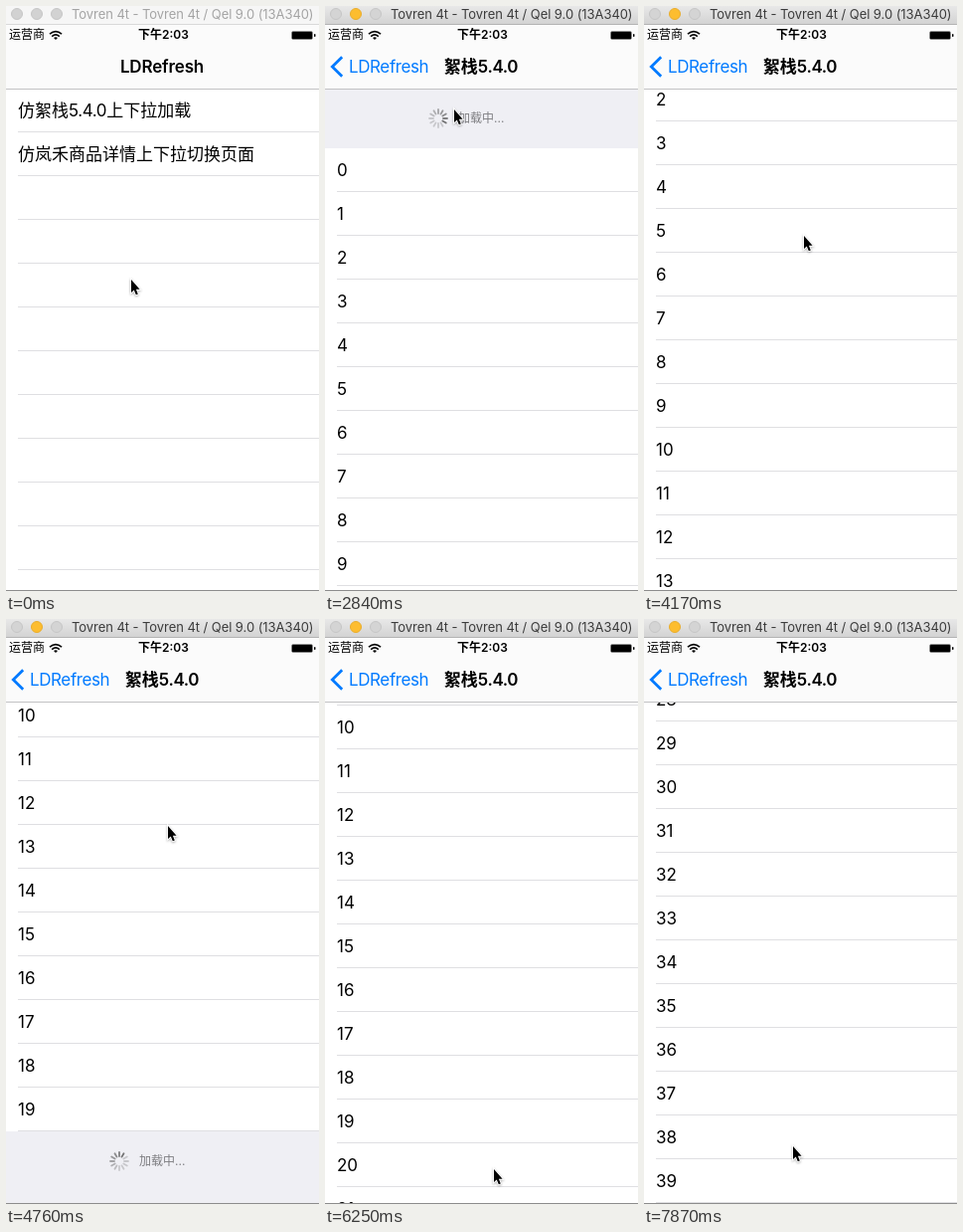
Recreate the animation shown at these times as an HTML page. Size 315 by 588 pixels, loop 8000 ms.

```html
<!DOCTYPE html>
<html lang="zh">
<head>
<meta charset="utf-8">
<title>LDRefresh</title>
<style>
html, body { margin: 0; width: 100%; height: 100%; overflow: hidden; background: #fff; }
#stage { position: relative; width: 315px; height: 588px; overflow: hidden; background: #fff;
  font: 17px/44px Inter, "Noto Sans CJK SC", sans-serif; color: #000; white-space: nowrap; }
#stage div, #stage svg, .abs { position: absolute; }
i { font-style: normal; letter-spacing: -0.4px; }

#bar { left: 0; top: 0; width: 315px; height: 18px; border-bottom: 1px solid #d9d9d9; background: #f6f6f6; color: #a4a4a4; }
#bar.on { background: linear-gradient(#e8e8e8, #d3d3d3); border-color: #b4b4b4; color: #3c3c3c; }
#bar b { position: absolute; top: 2px; width: 10px; height: 10px; border: 1px solid #c6c6c6; border-radius: 50%; background: #d2d2d2; }
#bar.on b { background: #d4d4d4; border-color: #c6c6c6; }
#bar.on b.mid { background: #fdbd2f; border-color: #e9ad2c; }
#bar span { left: 66px; top: 0; font-size: 13px; line-height: 17px; letter-spacing: -0.06px; }

#nav { left: 0; top: 19px; width: 315px; height: 64px; background: #fbfbfb; border-bottom: 1px solid #c2c2c4; overflow: hidden; }
#nav .small { font-size: 12px; line-height: 20px; top: 0; }
#nav .head { top: 20px; left: 0; width: 314px; text-align: center; font-weight: 600; }
#headA i { letter-spacing: -0.15px; }
#back { left: 24px; top: 20px; color: #007aff; }

.page { left: 0; top: 83px; width: 315px; height: 504px; background: #fff; overflow: hidden; }
.row { left: 0; width: 315px; height: 44px; }
.row span { position: absolute; left: 12px; right: 0; height: 43px; border-bottom: 1px solid #dfdfe2; }
#list { left: 0; top: 0; width: 315px; }
.load { left: 0; width: 315px; background: #efeff4; }
.load span { position: absolute; left: 134px; font-size: 12px; line-height: 60px; color: #7d7d80; }
.load svg { left: 102px; }
#edge { left: 0; top: 587px; width: 315px; height: 1px; background: #8d8d8d; }
#mouse { left: 0; top: 0; overflow: visible; filter: drop-shadow(0 1px 1px rgba(0,0,0,.3)); }
</style>
</head>
<body>
<div id="stage">
  <div class="page" id="menu"></div>
  <div class="page" id="feed"><div id="list"></div></div>
  <div id="nav">
    <div class="small" style="left:3px">运营商</div>
    <svg style="left:43px;top:5px" width="14" height="11" fill="none" stroke="#000" stroke-width="1.7">
      <path d="M1 4.2Q7 -1 13 4.2M3.2 6.6Q7 3.3 10.8 6.6"/><path d="M7 10L5 7.9Q7 6.5 9 7.9Z" fill="#000" stroke="none"/>
    </svg>
    <div class="small" style="left:133px;font-weight:600">下午2:03</div>
    <svg style="left:287px;top:5px" width="26" height="11">
      <rect x=".5" y="1.5" width="21" height="8" rx="1.5" fill="none" stroke="#8a8a8a"/>
      <rect x="1" y="2" width="20" height="7" rx=".5"/><rect x="23" y="4" width="1.5" height="3" rx=".7"/>
    </svg>
    <svg id="chev" style="left:5px;top:31px" width="14" height="22" fill="none" stroke="#007aff" stroke-width="2.8"><path d="M12.2 1.3L2.3 11L12.2 20.7"/></svg>
    <div id="back"><i>LDRefresh</i></div>
    <div class="head" id="headA"><i>LDRefresh</i></div>
    <div class="head" id="headB">絮栈<i>5.4.0</i></div>
  </div>
  <div id="bar">
    <b style="left:5px"></b><b class="mid" style="left:25px"></b><b style="left:45px"></b>
    <span class="abs">Tovren 4t - Tovren 4t / Qel 9.0 (13A340)</span>
  </div>
  <div id="edge"></div>
  <svg id="mouse" width="12" height="18"><path d="M0 0V13L2.8 10.6L4.8 15.2L6.8 14.4L4.9 9.8H8.6Z" stroke="#fff" stroke-width="1.8" paint-order="stroke"/></svg>
</div>
<script>
const $ = id => document.getElementById(id);
const LOOP = 8000, STEP = 148, ROW = 44, FIRST = 20, TOTAL = 40;

// Keys: step index, then values; step 0 is the tap.
const MOUSE = [[-13, 126, 275], [-9, 130, 104], [9, 130, 104], [13, 158, 330], [14, 161, 231],
  [15, 163, 208], [21, 163, 208], [26, 170, 553], [28, 170, 553], [30, 165, 330],
  [33, 160, 300], [37, 150, 530]];
const SCROLL = [[9, -60], [11, 0], [13, 0], [14, 99], [15, 185], [16, 300], [17, 395], [18, 448],
  [19, 436], [28, 436], [29, 520], [30, 659], [32, 930], [33, 1035], [34, 1120],
  [35, 1190], [36, 1235], [37, 1256]];
const PUSH = [[1, 0], [2, .45], [3, .9], [4, 1]];
const LOADED = 24;

function at(keys, n) {
  const j = keys.findIndex(k => k[0] > n);
  if (j === 0) return keys[0].slice(1);
  if (j < 0) return keys[keys.length - 1].slice(1);
  const a = keys[j - 1], b = keys[j], u = (n - a[0]) / (b[0] - a[0]);
  return a.slice(1).map((v, k) => v + (b[k + 1] - v) * u);
}

function addRow(parent, i, html) {
  const el = document.createElement('div');
  el.className = 'row';
  el.style.top = i * ROW + 'px';
  el.innerHTML = `<span>${html}</span>`;
  parent.append(el);
  return el;
}

// The loader strip is taller than its label so overscroll stays grey.
function addLoader(parent, top, height, labelTop) {
  let spokes = '';
  for (let i = 0; i < 12; i++)
    spokes += `<path d="M0 -5V-9" transform="rotate(${i * 30})" opacity="${.25 + .55 * Math.max(0, (i - 4) / 7)}"/>`;
  const el = document.createElement('div');
  el.className = 'load';
  el.style.cssText = `top:${top}px;height:${height}px`;
  el.innerHTML = `<svg style="top:${labelTop + 18}px" width="24" height="24" viewBox="-12 -12 24 24"
    stroke="#555" stroke-width="1.8" stroke-linecap="round"><g>${spokes}</g></svg>
    <span style="top:${labelTop}px">加载中...</span>`;
  parent.append(el);
  return el;
}

const menu = $('menu'), list = $('list');
const labels = ['仿絮栈<i>5.4.0</i>上下拉加载', '仿岚禾商品详情上下拉切换页面'];
for (let i = 0; i < 12; i++) addRow(menu, i, labels[i] || '');
const extra = [];
for (let i = 0; i < TOTAL; i++) {
  const el = addRow(list, i, i);
  if (i >= FIRST) extra.push(el);
}
addLoader(list, -160, 160, 100);
const footer = addLoader(list, FIRST * ROW, 160, 0);
const spinners = list.querySelectorAll('g');

const shift = (el, x, y = 0) => { el.style.transform = `translate(${x}px,${y}px)`; };
const fade = (el, o) => { el.style.opacity = o; };
const show = (el, on) => { el.style.visibility = on ? 'inherit' : 'hidden'; };

function stepAt(t) {
  return t < 2090 ? Math.min(-1, Math.floor((t - 300) / STEP) - 12) : Math.floor((t - 2090) / STEP);
}

function draw(n) {
  const [x, y] = at(MOUSE, n), [s] = at(SCROLL, n), [p] = at(PUSH, n);
  shift($('mouse'), Math.round(x), Math.round(y));
  $('bar').classList.toggle('on', n >= 0);

  menu.firstChild.style.background = n > 0 && n < 4 ? '#d9d9d9' : '';
  shift(menu, Math.round(-95 * p));
  shift($('feed'), Math.round(315 * (1 - p)));
  shift($('headA'), -91 * p);
  shift($('back'), 91 * (1 - p));
  shift($('headB'), 158 * (1 - p));
  fade($('headA'), 1 - p);
  for (const id of ['back', 'chev', 'headB']) fade($(id), p);

  shift(list, 0, -Math.round(s));
  const loaded = n >= LOADED;
  extra.forEach(el => show(el, loaded));
  show(footer, !loaded);
  const turn = Math.floor(n * 1.62) * 30 - 90;
  spinners.forEach(g => g.setAttribute('transform', `rotate(${turn})`));
}

const start = performance.now();
let last = null;
function tick() {
  const n = stepAt((performance.now() - start) % LOOP);
  if (n !== last) draw(last = n);
  requestAnimationFrame(tick);
}
tick();
</script>
</body>
</html>
```
